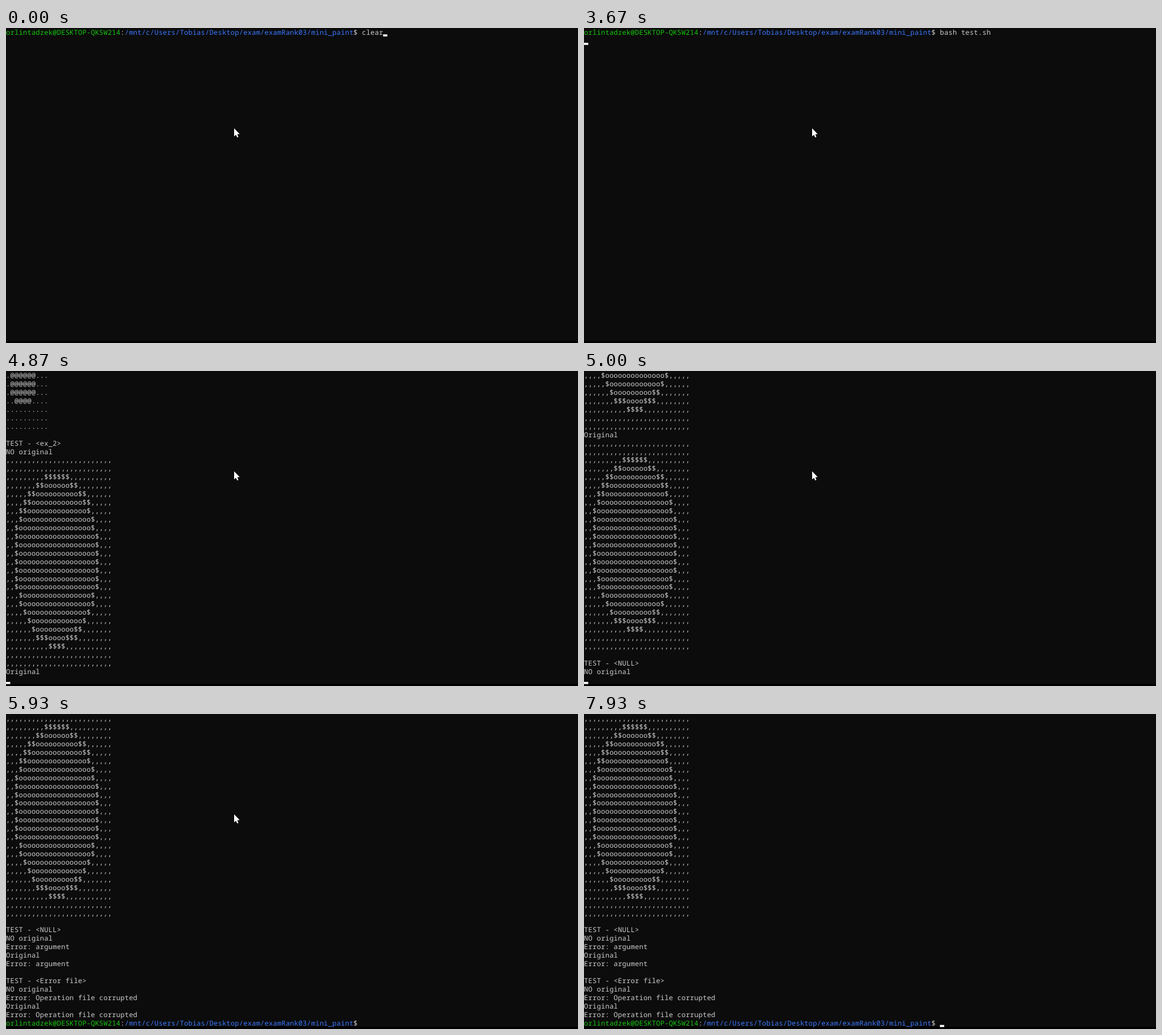
An HTML page with a canvas that plays this animation: 1008 by 556 pixels, repeating every 8 s.

```html
<!DOCTYPE html>
<html lang="en">
<head>
<meta charset="utf-8">
<title>Terminal session</title>
<style>
  html, body { margin: 0; width: 100%; height: 100%; overflow: hidden; background: #0c0c0c; }
  canvas { display: block; }
</style>
</head>
<body>
<canvas id="screen" width="1008" height="556"></canvas>
<script>
const ctx = document.getElementById('screen').getContext('2d');

// The terminal is a grid of 8 by 16 cells, shown slightly reduced
const SCALE = 14 / 15;
const CELL = 8;
const ROW = 16;
const ROWS = 37;
const BASELINE = 13;
const COLORS = { bg: '#0c0c0c', edge: '#000', text: '#cccccc', user: '#16c60c', path: '#3b78ff', cursor: '#ffffff' };

// All times below are in ticks of 1/15 second
const LOOP = 120;
const HISTORY = 1;
const RECALL = 16;
const IDLE = 26;
const ENTER = 55;
const LAUNCH = 68;
const READY = 81;
const BLINK = 8;
const LEAVE = 110;
const LEAVE_STEPS = 9;

const USER = 'orlintadzek@DESKTOP-QK5W214';
const PATH = '/mnt/c/Users/Tobias/Desktop/exam/examRank03/mini_paint';

const promptLine = cmd => [
  [USER, COLORS.user], [':', COLORS.text], [PATH, COLORS.path], ['$ ' + cmd, COLORS.text]
];
const plainLine = text => [[text, COLORS.text]];

// Text picture of a disc with a border one character thick
function disc(size, cx, cy, r, [back, edge, fill]) {
  const charAt = (x, y) => {
    const depth = r - Math.hypot(x - cx, y - cy);
    return depth < 0 ? back : depth < 1 ? edge : fill;
  };
  return Array.from({ length: size }, (_, y) =>
    Array.from({ length: size }, (_, x) => charAt(x, y)).join(''));
}

const tests = [
  ['ex_1', disc(10, 3.5, 3.5, 3, '.@@')],
  ['ex_2', disc(25, 11.42, 11.85, 10.29, ',$o')],
  ['NULL', ['Error: argument']],
  ['Error file', ['Error: Operation file corrupted']]
];

// Output stops before each result; long bursts take an extra tick
const output = [];
const bursts = [];
let printTick = LAUNCH;
function print(lines) {
  const first = bursts.length === 1;
  if (bursts.length) printTick += first ? 3 : Math.ceil(lines.length / 27);
  output.push(...lines);
  bursts.push({ tick: printTick, count: output.length });
}

let pending = [];
for (const [name, result] of tests) {
  print([...pending, '', `TEST - <${name}>`, 'NO original']);
  print([...result, 'Original']);
  pending = result;
}
print(pending);
const DONE = printTick + 1;

const activity = [IDLE, ENTER, ...bursts.map(burst => burst.tick), READY];

function cursorVisible(tick) {
  const last = activity.findLast(t => t <= tick) ?? tick;
  return Math.floor((tick - last) / BLINK) % 2 === 0;
}

function linesAt(tick) {
  const cmd = tick < HISTORY ? 'clear' : tick < RECALL ? 'cle.test' : 'bash test.sh';
  const lines = [promptLine(cmd)];
  if (tick >= ENTER) {
    const count = bursts.findLast(burst => burst.tick <= tick)?.count ?? 0;
    lines.push(...output.slice(0, count).map(plainLine));
    lines.push(tick >= DONE ? promptLine('') : plainLine(''));
  }
  return lines.slice(-ROWS);
}

// Draws one line on the character grid and returns the column after it
function drawLine(line, row) {
  let col = 0;
  for (const [text, color] of line) {
    ctx.fillStyle = color;
    for (const char of text) {
      if (char !== ' ') ctx.fillText(char, col * CELL + 0.1, row * ROW + BASELINE);
      col++;
    }
  }
  return col;
}

function drawTerminal(tick) {
  ctx.save();
  ctx.scale(SCALE, SCALE);
  ctx.fillStyle = COLORS.edge;
  ctx.fillRect(0, ROWS * ROW, 1080, ROW);

  ctx.font = '500 13px "Noto Sans Mono", "DejaVu Sans Mono", monospace';
  ctx.textRendering = 'geometricPrecision';
  const lines = linesAt(tick);
  let col = 0;
  lines.forEach((line, row) => { col = drawLine(line, row); });

  if (cursorVisible(tick)) {
    ctx.fillStyle = COLORS.cursor;
    ctx.fillRect(col * CELL, lines.length * ROW - 4, CELL, 4);
  }
  ctx.restore();
}

function drawPointer(tick) {
  const p = Math.max(0, Math.min(1, (tick - LEAVE) / LEAVE_STEPS));
  const ease = p * p * (3 - 2 * p);
  const x = 402 + 608 * ease;
  const y = 177 - 164 * ease;
  const arrow = [[0, 0], [0, 14.3], [3.3, 11.4], [5.4, 16.2], [7.6, 15.2], [5.6, 10.6], [9.8, 10.2]];
  ctx.beginPath();
  for (const [dx, dy] of arrow) ctx.lineTo(x + dx, y + dy);
  ctx.closePath();
  ctx.lineWidth = 1;
  ctx.strokeStyle = '#000';
  ctx.stroke();
  ctx.fillStyle = '#fff';
  ctx.fill();
}

function draw(ms) {
  const tick = Math.floor((ms + 5) * 15 / 1000) % LOOP;
  ctx.fillStyle = COLORS.bg;
  ctx.fillRect(0, 0, 1008, 556);
  drawTerminal(tick);
  drawPointer(tick);
}

const begin = performance.now();
function frame() {
  draw(performance.now() - begin);
  requestAnimationFrame(frame);
}
frame();
</script>
</body>
</html>
```
